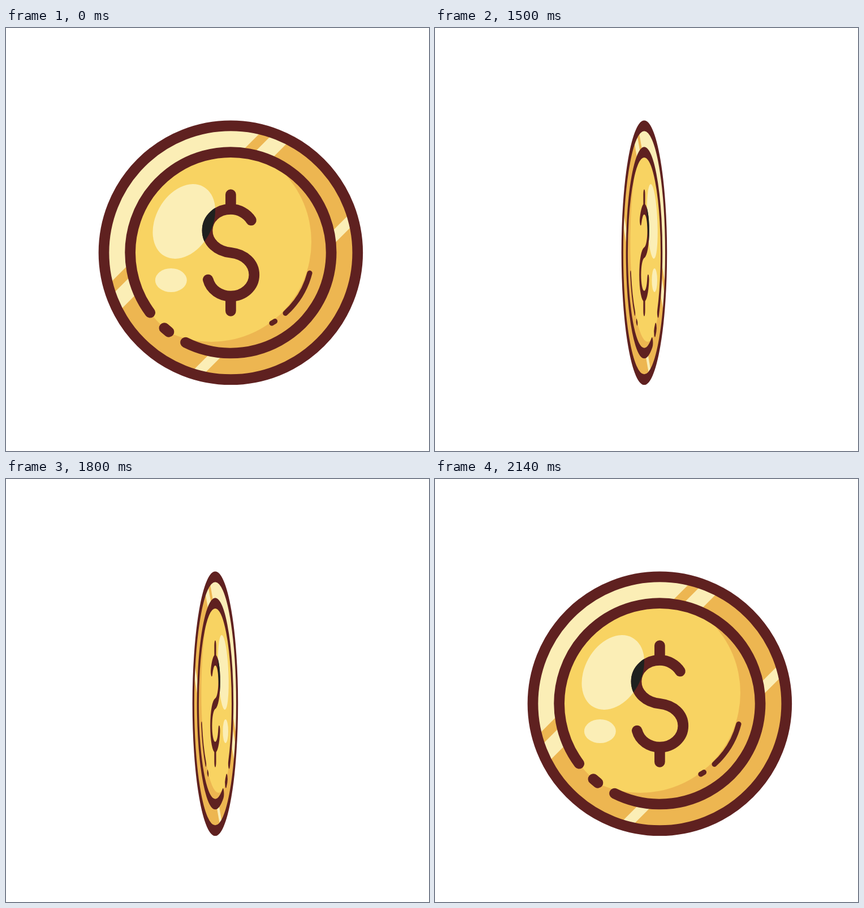
These frames come from a looping animation (748 by 748 pixels, 2980 ms). An HTML page:

```html
<!DOCTYPE html>
<html lang="en">
<head>
<meta charset="utf-8">
<title>Spinning coin</title>
<style>
  html, body { margin: 0; height: 100%; overflow: hidden; background: #fff; }
  svg { display: block; width: 100vw; height: 100vh; }
  .orange { fill: #edb651; }
  .yellow { fill: #f8d362; }
  .cream { fill: #fbeeb6; }
  .shine { stroke: #fbeeb6; }
  .line { fill: none; stroke: #5f2120; stroke-width: 18.7; stroke-linecap: round; }
  .thin { stroke-width: 9.2; }
</style>
</head>
<body>
<svg viewBox="0 0 748 748">
  <defs>
    <clipPath id="rim"><circle cx="397.4" cy="397.3" r="222"/></clipPath>
    <clipPath id="face"><circle cx="397.4" cy="397.3" r="177.5"/></clipPath>
    <clipPath id="gloss"><ellipse cx="314.8" cy="342" rx="49.7" ry="70.3" transform="rotate(29.2 314.8 342)"/></clipPath>
    <path id="ess" d="M433.5 340C426 328 412 320.4 397.4 320.4C374 320.4 356 337 356 358C356 379 373 394.5 397.4 397.3S438.8 415.6 438.8 436.6S420.4 474.2 397.4 474.2C379 474.2 362 463 357.3 445"/>
  </defs>
  <g id="coin">
    <g clip-path="url(#rim)">
      <circle class="orange" cx="397.4" cy="397.3" r="224"/>
      <path class="cream" d="M0 0H635L0 635Z"/>
      <path class="shine" stroke-width="29.5" d="M680 0L0 680"/>
      <path class="shine" stroke-width="18" d="M949 0L0 949"/>
    </g>
    <g clip-path="url(#face)">
      <circle class="orange" cx="397.4" cy="397.3" r="178"/>
      <circle class="yellow" cx="363" cy="378" r="177"/>
    </g>
    <circle class="line" cx="397.4" cy="397.3" r="224.4"/>
    <g id="arcs"></g>
    <ellipse class="cream" cx="291.8" cy="446" rx="28" ry="21"/>
    <path class="cream" clip-path="url(#gloss)" d="M240 260H390V420H240Z"/>
    <path class="line" d="M397.4 294.5V320M397.4 475V500.3"/>
    <use href="#ess" class="line"/>
    <g clip-path="url(#gloss)"><use href="#ess" class="line" style="stroke:#1f211f"/></g>
  </g>
</svg>
<script>
  const LOOP = 2980, START = 1160, SPIN = 980, STEP = 20, PIVOT = 374;
  const coin = document.getElementById('coin');

  // Clockwise arc around the coin's centre, angles in degrees.
  function arc(r, from, to, cls) {
    const point = deg => {
      const a = deg * Math.PI / 180;
      return `${397.4 + r * Math.cos(a)} ${397.3 + r * Math.sin(a)}`;
    };
    return `<path class="${cls}" d="M${point(from)}A${r} ${r} 0 ${+(to - from > 180)} 1 ${point(to)}"/>`;
  }

  document.getElementById('arcs').innerHTML =
    arc(177.7, 143.4, 476.7, 'line') +
    arc(177.7, 128, 131.4, 'line') +
    arc(144.2, 14.5, 47.9, 'line thin') +
    arc(144.2, 57.2, 59.8, 'line thin');

  const begin = performance.now();

  function draw(now) {
    const t = Math.floor(Math.max(0, now - begin) % LOOP / STEP) * STEP;
    const u = Math.min(1, Math.max(0, (t - START) / SPIN));
    const turn = u * u * (3 - 2 * u);
    const s = Math.cos(2 * Math.PI * turn);
    coin.setAttribute('transform', `matrix(${s} 0 0 1 ${PIVOT * (1 - s)} 0)`);
    requestAnimationFrame(draw);
  }
  draw(begin);
</script>
</body>
</html>
```
